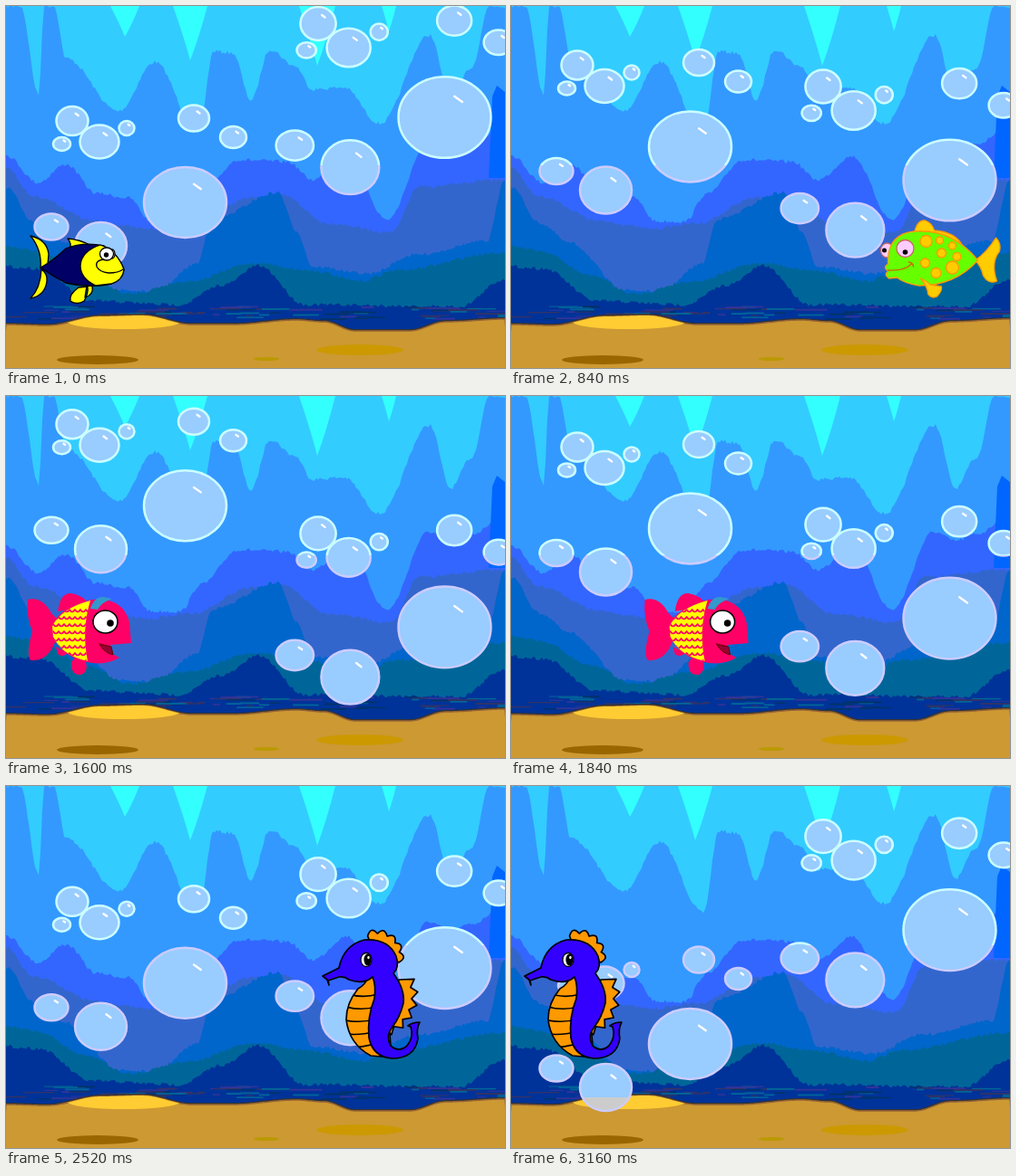
An HTML page with a canvas that plays this animation: 550x400 px, repeating every 3.2 s.

```html
<!DOCTYPE html>
<html lang="en">
<head>
<meta charset="utf-8">
<title>Under the sea</title>
<style>
html, body { margin: 0; width: 100%; height: 100%; overflow: hidden; }
canvas { display: block; }
</style>
</head>
<body>
<canvas id="stage" width="550" height="400"></canvas>
<script>
const stage = document.getElementById('stage');
const backdrop = stage.cloneNode();
let ctx = backdrop.getContext('2d');

let seed = 7;
const rand = () => (seed = seed * 16807 % 2147483647) / 2147483647;

function paint(path, fill, stroke, width) {
  if (fill) { ctx.fillStyle = fill; ctx.fill(path); }
  if (stroke) { ctx.strokeStyle = stroke; ctx.lineWidth = width; ctx.stroke(path); }
}

const shape = (d, fill, stroke, width = 1.3) => paint(new Path2D(d), fill, stroke, width);

function oval(x, y, rx, ry, fill, stroke, width = 1.3) {
  const path = new Path2D();
  path.ellipse(x, y, rx, ry, 0, 0, Math.PI * 2);
  paint(path, fill, stroke, width);
}

const polar = (x, y, r, deg) => {
  const a = deg * Math.PI / 180;
  return `${x + r * Math.cos(a)},${y + r * Math.sin(a)} `;
};

// Area below a roughened curve eased through key points "x,y x,y ...".
function ridge(keys, rough = 0) {
  const points = keys.split(' ').map(p => p.split(',').map(Number));
  let d = 'M-5,410 ';
  for (let x = 0, i = 0; x <= 550; x += 2) {
    if (x > points[i + 1][0]) i++;
    const [x0, y0] = points[i], [x1, y1] = points[i + 1];
    const ease = (1 - Math.cos(Math.PI * (x - x0) / (x1 - x0))) / 2;
    d += `L${x},${y0 + (y1 - y0) * ease + (rand() - .5) * rough} `;
  }
  return d + 'L555,410Z';
}

function drawBackdrop() {
  ctx.fillStyle = '#3cf';
  ctx.fillRect(0, 0, 550, 400);
  for (const [x, depth, half] of [[131, 34, 16], [203, 60, 19], [343, 66, 20], [422, 28, 8]])
    shape(`M${x - half},0 Q${x - half / 3},${depth * .6} ${x},${depth} Q${x + half / 2},${depth * .6} ${x + half},0Z`, '#3ff');

  const water = {
    '#39f': '0,0 16,0 36,98 42,0 53,0 66,58 124,116 164,62 212,140 229,50 250,52 270,104 291,48 318,66 338,92 372,90 412,130 467,32 490,102 513,68 533,0 550,0',
    '#36f': '0,165 35,195 66,175 100,207 135,212 160,238 192,238 215,208 256,170 310,172 338,192 376,166 420,236 466,150 490,160 515,152 550,130',
    '#36c': '0,178 30,210 100,238 155,246 205,240 270,212 305,210 355,240 425,250 455,200 550,192',
    '#06c': '0,200 32,240 65,262 125,314 165,316 210,285 228,235 300,206 320,248 338,288 400,296 450,275 530,260 550,190',
    '#069': '0,265 30,270 90,298 135,318 200,304 275,284 335,292 390,304 430,292 550,272',
    '#039': '0,288 35,290 95,326 190,330 240,308 278,287 330,330 500,332 550,302'
  };
  for (const [color, keys] of Object.entries(water)) {
    shape(ridge(keys, 4), color);
    if (color === '#36c') shape('M532,190 L536,100 L541,88 L550,95 V190Z', '#06f');
  }

  // Thin ripples just above the sand.
  for (let i = 0; i < 80; i++) {
    ctx.fillStyle = ['#339', '#069', '#036', '#336'][i % 4];
    ctx.fillRect(rand() * 570 - 20, 331 + rand() * 15, 8 + rand() * 28, 1 + rand());
  }

  const sand = ridge('0,352 45,353 105,343 150,342 205,352 250,352 320,347 350,349 385,359 445,359 485,349 550,346');
  shape(sand, '#c93', '#333', 4);
  shape(sand, '#c93', '#963', 1.5);
  ctx.save();
  ctx.clip(new Path2D(sand));
  oval(130, 349, 62, 8, '#fc3');
  ctx.restore();
  oval(390, 380, 48, 6, '#c90');
  oval(287, 390, 14, 2, '#b90');
  oval(101, 391, 45, 5, '#960');
}

// x, y, horizontal radius, vertical radius
const leftBubbles = [
  [73, 127, 17.5, 16], [103, 150, 21.5, 18.5], [61.5, 152.5, 9.5, 7.5], [133, 135, 8.5, 8],
  [207, 124, 17, 14.5], [250.5, 145, 14.5, 12], [197.5, 217, 45.5, 39], [50, 244, 18.5, 14.5], [104.5, 265, 28.5, 26]
];
// The right group repeats the left one, enlarged around its biggest bubble.
const rightBubbles = leftBubbles.map(([x, y, rx, ry]) =>
  [483.5 + (x - 197.5) * 1.12, 123 + (y - 217) * 1.15, rx * 1.12, ry * 1.15]);

function hardSplit(y, above, below) {
  const g = ctx.createLinearGradient(0, 0, 0, 400);
  [[0, above], [y / 400, above], [y / 400, below], [1, below]].forEach(s => g.addColorStop(...s));
  return g;
}

function drawBubbles(list, dy) {
  for (const [x, y0, rx, ry] of list) {
    const y = y0 + dy;
    oval(x, y, rx, ry, glass, rim, 2.5);
    shape(`M${x + rx * .21},${y - ry * .52} L${x + rx * .38},${y - ry * .38}`, null, '#fff', 2.4);
  }
}

function yellowFish() {
  const yellow = '#ff0', ink = '#000';
  shape('M27,254 Q45,258 47,274 L46,285 L38,290 Q40,270 27,254Z', yellow, ink);
  shape('M39,291 Q46,296 45,304 Q43,320 27,323 Q38,312 39,291Z', yellow, ink);
  shape('M68,257 Q73,262 70,270 L94,265 Q82,258 68,257Z', yellow, ink);
  shape('M89,309 L95,309 Q97,319 87,322Z M80,311 Q69,319 71,326 Q78,331 86,326 Q91,318 90,310Z', yellow, ink);
  shape('M38,289 Q50,283 66,268 Q85,260 108,265 Q124,274 130,291 Q128,303 116,307 Q94,312 66,306 Q52,299 38,289Z', '#006', ink);
  shape('M104,264 Q122,270 130,291 Q129,303 116,307 L99,309 Q82,301 82,287 Q83,271 104,264Z', yellow, ink);
  oval(117, 274, 3, 5, '#fff', ink);
  oval(111, 274, 7.5, 7, '#fff', ink);
  oval(110.5, 275, 2.7, 2.7, ink);
  shape('M108,280 Q98,281 100,288 Q103,294 113,295 Q124,295 129,291', null, ink);
}

function greenFish() {
  const gold = '#fc0', edge = '#f90';
  shape('M260,251 Q263,236 272,237 Q280,240 282,248 Q306,250 313,265Z', gold, edge);
  shape('M327,281 Q340,272 350,256 Q356,262 354,271 Q344,283 351,304 Q342,308 336,298 Q334,288 327,281Z', gold, edge);
  oval(230, 270, 7, 8, '#fcf', '#c66');
  oval(227, 270, 2.5, 2.5, '#000');
  shape('M231,280 Q232,252 260,249 Q302,246 330,281 Q305,309 265,309 Q248,306 241,300 L232,301 Q226,297 231,293 Q225,289 231,285Z', '#6f0', edge);
  shape('M267,301 Q274,304 278,308 L290,310 Q291,315 285,321 Q279,324 275,318 Q275,311 267,301Z', gold, edge);
  [[273, 260, 6.5], [288, 259, 4], [302, 265, 4], [290, 273, 5], [307, 277, 4.5],
    [272, 284, 5], [302, 289, 7], [284, 295, 5.5]].forEach(([x, y, r]) => oval(x, y, r, r, gold, edge));
  oval(250, 268, 9.5, 9.5, '#fcf', '#c66');
  oval(250, 272, 2.8, 2.8, '#000');
  shape('M231,292 Q249,293 257,285 M254,283 Q259,284 259,288', null, '#c60');
}

function redFish() {
  const pink = '#f06';
  shape('M24,225 Q40,221 50,240 L60,250 L55,270 Q46,294 27,292 Q22,285 29,260 Q22,244 24,225Z', pink);
  shape('M57,238 Q60,217 72,218 Q86,220 92,232Z', pink);
  shape('M72,294 Q80,282 88,294 Q91,304 83,308 Q71,309 72,294Z M55,277 L68,284 Q63,290 57,285Z', pink);
  shape('M50,254 Q62,231 95,225 Q129,222 136,250 L138,273 L115,275 L117,285 L125,289 Q112,297 95,295 Q63,291 51,264Z', pink);

  ctx.save();
  ctx.clip(new Path2D('M51,254 Q62,234 93,226 Q83,258 90,293 Q62,287 52,266Z'));
  ctx.fillStyle = '#ff0';
  ctx.fillRect(45, 220, 55, 80);
  for (let y = 236; y < 296; y += 8) shape(`M46,${y}` + 'q3,5 6,0'.repeat(9), null, pink, 1.7);
  ctx.restore();

  shape('M93,235 Q97,222 107,222 L117,224 Q105,228 101,236Z', '#39c');
  oval(109.5, 249.5, 13.5, 12.5, '#fff', '#000', 1.5);
  oval(115, 251, 3.8, 3.8, '#000');
  shape('M103,274 L116,277 L118,286 Q108,284 103,274Z', '#903', '#600', 1);
}

function seahorse() {
  const orange = '#f90', ink = '#000';

  let crest = 'M' + polar(408, 189, 25, -112);
  for (let a = -112; a < 10; a += 25) crest += 'Q' + polar(408, 189, 35, a + 12) + polar(408, 189, 26, a + 25);
  shape(crest + 'L408,189Z', orange, ink, 1.7);

  let fin = 'M433,214 ';
  for (let a = -24; a < 72; a += 18.5) fin += 'L' + polar(408, 232, 46, a) + 'L' + polar(408, 232, 39, a + 10);
  shape(fin + 'L416,270Z', orange, ink, 1.7);

  const belly = 'M398,212 Q397,219 388,224 Q375,240 375,258 Q378,285 402,298 L425,300 L420,235 L407,208Z';
  shape(belly, orange, ink, 1.7);
  ctx.save();
  ctx.clip(new Path2D(belly));
  for (let i = 0; i < 5; i++) shape(`M370,${227 + i * 15.5} q20,${9 - i * 2} 40,${3 - i * 2}`, null, ink, 1.7);
  ctx.restore();

  shape('M349,210 L367,201 Q372,176 395,170 Q421,168 430,188 Q434,200 427,207 Q440,225 438,240 Q434,256 426,266 Q418,276 424,287 ' +
    'Q433,295 442,287 Q450,277 446,266 L443,265 Q448,261 456,261 Q452,268 454,279 Q451,301 425,301 ' +
    'Q404,299 400,278 Q398,255 406,235 Q408,220 404,211 Q394,220 378,214 Q373,210 367,211 L355,215 L356,220 L354,214Z', '#30f', ink, 1.7);
  oval(397, 192, 6, 7.5, '#fff', ink);
  oval(398.5, 192, 4, 6.5, ink);
  oval(399.5, 189.5, 1.2, 1.8, '#fff');
}

// Each swimmer crosses for 20 ticks; "home" is the tick at which it is drawn unshifted.
const swimmers = [
  { draw: yellowFish, home: 0, vx: 20.13, vy: -.12 },
  { draw: greenFish, home: 30, vx: -20.5, vy: 0 },
  { draw: redFish, home: 40, vx: 20.6, vy: 0 },
  { draw: seahorse, home: 63, vx: -20.88, vy: 0 }
];

// Drift at one speed until the turning tick, then back at another.
const drift = (tick, turn, there, back) => there * Math.min(tick, turn) + back * Math.max(tick - turn, 0);

drawBackdrop();
ctx = stage.getContext('2d');
ctx.lineCap = ctx.lineJoin = 'round';
const glass = hardSplit(344, '#9cf', '#ccc');
const rim = hardSplit(176, '#cff', '#ccf');

function render(now) {
  const tick = Math.floor(now % 3200 / 40);
  ctx.drawImage(backdrop, 0, 0);
  drawBubbles(leftBubbles, drift(tick, 37, -2.93, 4.2));
  drawBubbles(rightBubbles, drift(tick, 41, 3.31, -2.62));
  const { draw, home, vx, vy } = swimmers[Math.floor(tick / 20)];
  ctx.save();
  ctx.translate(vx * (tick - home), vy * (tick - home));
  draw();
  ctx.restore();
}

const start = performance.now();
function loop() {
  render(performance.now() - start);
  requestAnimationFrame(loop);
}
loop();
</script>
</body>
</html>
```
